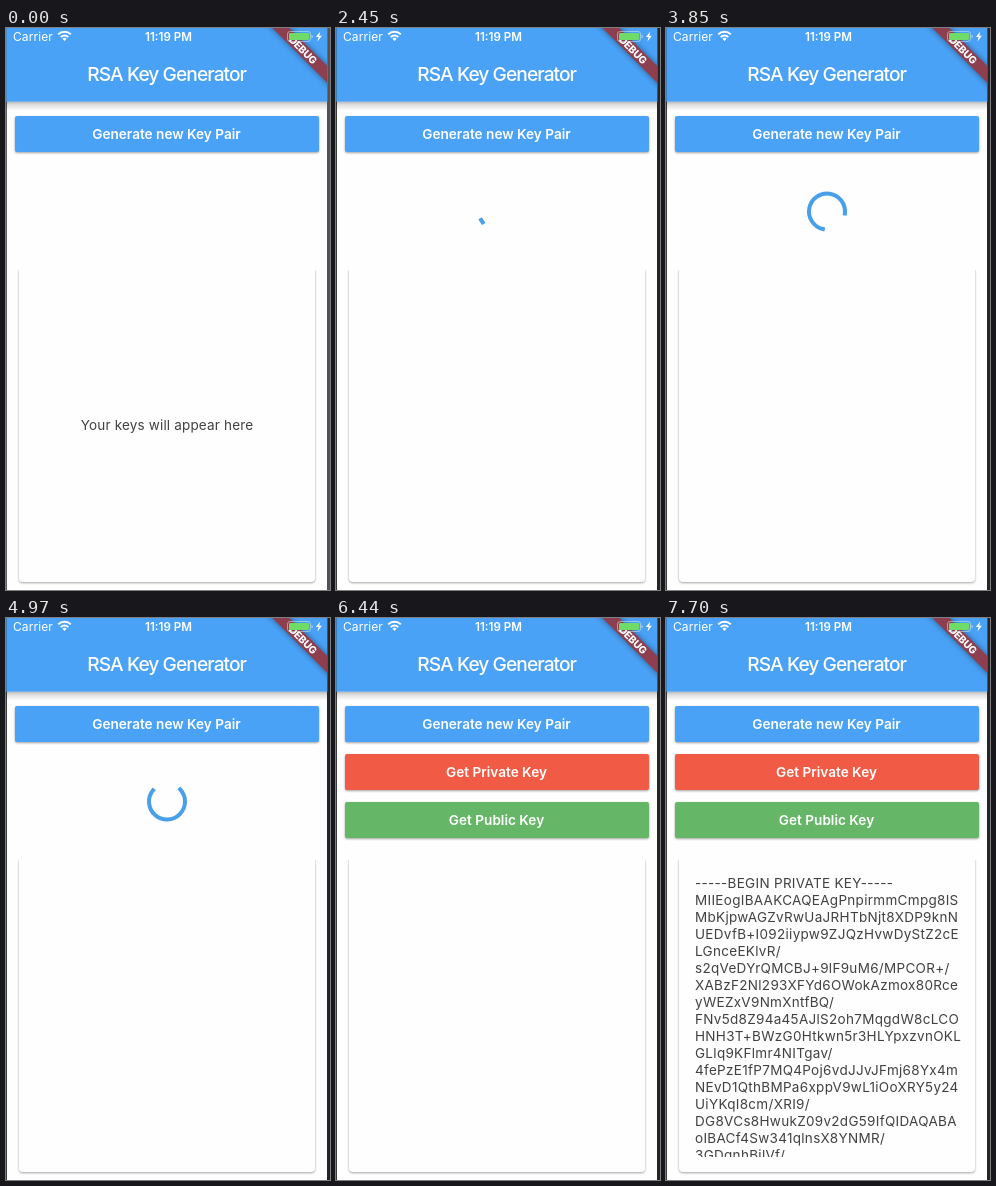
An HTML page that plays this animation: 324 px wide and 562 px high, repeating every 8 s.

```html
<!DOCTYPE html>
<html lang="en">
<head>
<meta charset="utf-8">
<title>RSA Key Generator</title>
<style>
  html, body { margin: 0; width: 100%; height: 100%; overflow: hidden; background: #fff; }
  svg { display: block; width: 324px; height: 562px; }
  text { font-family: Inter, "Open Sans", sans-serif; white-space: pre; }
  .mid { text-anchor: middle; }
  .label { font-size: 13.6px; font-weight: 600; fill: #fff; }
  .body { font-size: 13.5px; fill: #414141; letter-spacing: .17px; }
  #key { letter-spacing: .3px; }
</style>
</head>
<body>
<svg id="stage" viewBox="0 0 324 562" xmlns="http://www.w3.org/2000/svg">
  <defs>
    <clipPath id="page"><rect width="321" height="562"/></clipPath>
    <clipPath id="keyBox"><rect x="13" y="250" width="296" height="289"/></clipPath>
    <linearGradient id="barShade" x2="0" y2="1">
      <stop offset="0" stop-color="#000" stop-opacity=".28"/>
      <stop offset=".35" stop-color="#000" stop-opacity=".13"/>
      <stop offset="1" stop-color="#000" stop-opacity="0"/>
    </linearGradient>
  </defs>
  <rect width="324" height="562" fill="#fefefe"/>

  <g style="filter:drop-shadow(0 1px 1px rgba(0,0,0,.36))">
    <rect x="13" y="239" width="296" height="315" rx="4" fill="#fefefe"/>
  </g>
  <rect x="10" y="234" width="302" height="8" fill="#fefefe"/>
  <text id="hint" class="body mid" x="161" y="402">Your keys will appear here</text>
  <g id="key" class="body" clip-path="url(#keyBox)"></g>

  <path id="ring" fill="none" stroke="#4a9fe9" stroke-width="4" stroke-linecap="square"/>
  <g id="buttons"></g>

  <rect id="edgeL" width="1" height="562"/>
  <rect id="edgeR" x="321" width="3" height="562"/>

  <rect y="73.5" width="321" height="9" fill="url(#barShade)"/>
  <rect x=".4" width="321" height="73.7" fill="#4aa2f7"/>
  <text class="mid" x="160.7" y="53" fill="#fff" font-size="19.2" font-weight="550" letter-spacing="-.95">RSA Key Generator</text>

  <g clip-path="url(#page)">
    <g transform="translate(321 -2) rotate(45)">
      <rect x="-60" y="28" width="120" height="12" fill="#8d3f4f" style="filter:drop-shadow(0 0 3px rgba(0,0,0,.45))"/>
      <text class="mid" y="37.7" fill="#fff" font-size="10.2" font-weight="800" letter-spacing="-.2">DEBUG</text>
    </g>
  </g>

  <g fill="#fff" font-size="12">
    <text x="7" y="12.6" letter-spacing=".1">Carrier</text>
    <text class="mid" x="162.5" y="12.6" font-weight="600" font-size="11.6">11:19 PM</text>
    <g fill="none" stroke="#fff" stroke-width="2">
      <path d="M52.2 6.4a9 9 0 0 1 12.6 0M54.7 9.1a5.4 5.4 0 0 1 7.6 0"/>
    </g>
    <path d="M56.4 10.7a3 3 0 0 1 4.2 0L58.5 13z"/>
    <rect x="281.5" y="3.5" width="23" height="10" rx="2.5" fill="none" stroke="#d8e6e8" stroke-opacity=".55"/>
    <rect x="283" y="5" width="20" height="7" rx="1.2" fill="#6fdc6a"/>
    <path d="M305.7 6.7q2 1.8 0 3.6z" fill="#d8e6e8"/>
    <path d="M314.3 3.5l-4.4 5.6h2.7l-1.2 4.4 4.5-5.8h-2.7z"/>
  </g>
</svg>
<script>
const LOOP = 8000, STEP = 70, LAST = 7700;
const FOCUS = 1120, START = 1340, READY = 5530, SHOW = 6930;
const BLUE = '#4aa2f7', RED = '#f15b46', GREEN = '#66b667';
const KEY = `-----BEGIN PRIVATE KEY-----
MIIEogIBAAKCAQEAgPnpirmmCmpg8IS
MbKjpwAGZvRwUaJRHTbNjt8XDP9knN
UEDvfB+I092iiypw9ZJQzHvwDyStZ2cE
LGnceEKlvR/
s2qVeDYrQMCBJ+9lF9uM6/MPCOR+/
XABzF2Nl293XFYd6OWokAzmox80Rce
yWEZxV9NmXntfBQ/
FNv5d8Z94a45AJlS2oh7MqgdW8cLCO
HNH3T+BWzG0Htkwn5r3HLYpxzvnOKL
GLlq9KFlmr4NITgav/
4fePzE1fP7MQ4Poj6vdJJvJFmj68Yx4m
NEvD1QthBMPa6xppV9wL1iOoXRY5y24
UiYKqI8cm/XRI9/
DG8VCs8HwukZ09v2dG59IfQIDAQABA
oIBACf4Sw341qlnsX8YNMR/
3GDqnhBjlVf/`;

const $ = id => document.getElementById(id);
const clamp = v => Math.max(0, Math.min(1, v));
const lerp = (a, b, u) => a + (b - a) * u;
const show = (el, on) => el.setAttribute('display', on ? 'inline' : 'none');

$('key').innerHTML = KEY.split('\n')
  .map((line, i) => `<text x="29" y="${270 + 17 * i}">${line}</text>`).join('');

function makeButton(y, fill, label, press) {
  const g = document.createElementNS('http://www.w3.org/2000/svg', 'g');
  const box = `x="9" y="${y}" width="304" height="36"`;
  g.innerHTML = `<clipPath id="clip${y}"><rect ${box} rx="2"/></clipPath>
    <rect class="face" ${box} rx="2" fill="${fill}"/>
    <g clip-path="url(#clip${y})">
      <rect class="glow" ${box} fill="#bcbcbc"/>
      <circle class="wave" cy="${y + 18}" fill="#c8c8c8"/>
    </g>
    <text class="label mid" x="160.5" y="${y + 23}">${label}</text>`;
  $('buttons').append(g);
  const part = name => g.querySelector('.' + name);
  return { g, face: part('face'), glow: part('glow'), wave: part('wave'), press };
}

const buttons = [
  makeButton(88, BLUE, 'Generate new Key Pair', { down: 1120, up: 1330, x: 110 }),
  makeButton(136, RED, 'Get Private Key', { down: 6720, up: 6930, x: 150 }),
  makeButton(184, GREEN, 'Get Public Key', null)
];

// Touch ripple: slow while held, fast and fading after release.
function drawButton({ face, glow, wave, press }, t) {
  let r = 0, x = 161, fade = 0, held = 0, lift = 0;
  if (press && t >= press.down) {
    const hold = Math.min(t, press.up) - press.down, after = Math.max(0, t - press.up);
    r = Math.min(180, hold * .15 + after * .63);
    x = lerp(press.x, 161, r / 180);
    fade = .4 * clamp(1 - after / 210);
    held = .3 * clamp(hold / 210) * clamp(1 - after / 130);
    lift = clamp(hold / 210) * clamp(1 - after / 280);
  }
  wave.setAttribute('cx', x);
  wave.setAttribute('r', r);
  wave.setAttribute('opacity', fade);
  glow.setAttribute('opacity', held);
  face.style.filter = `drop-shadow(0 ${1 + lift}px ${1.2 + 1.6 * lift}px rgba(0,0,0,.37))`;
}

// Cubic curve (.4, 0, .2, 1) solved by bisection.
function ease(x) {
  let a = 0, b = 1, s = .5;
  for (let i = 0; i < 24; i++) {
    s = (a + b) / 2;
    const v = 1 - s;
    if (1.2 * v * v * s + .6 * v * s * s + s * s * s < x) a = s; else b = s;
  }
  return s * s * (3 - 2 * s);
}

// Turns of the ring; it loses a little time half way through.
function ringPhase(t) {
  const lag = .08 * clamp((t - 3850) / 1120);
  return Math.max(0, .117 + (t - 1470) / 1044 - lag);
}

function ringPath(p) {
  const n = Math.floor(p), f = p - n;
  const head = ease(clamp(f * 2)), tail = ease(clamp(f * 2 - 1));
  const from = Math.PI * (-.5 + 1.5 * tail + 1.7 * f + 1.2 * n);
  const sweep = Math.max(Math.PI * 1.5 * (head - tail), .001);
  const at = a => `${161 + 18 * Math.cos(a)} ${183.5 + 18 * Math.sin(a)}`;
  return `M${at(from)}A18 18 0 ${sweep > Math.PI ? 1 : 0} 1 ${at(from + sweep)}`;
}

function draw(t) {
  const busy = t >= START && t < READY;
  show($('hint'), t < START);
  show($('key'), t >= SHOW);
  show($('ring'), busy);
  if (busy) $('ring').setAttribute('d', ringPath(ringPhase(t)));
  buttons.forEach((b, i) => {
    show(b.g, i === 0 || t >= READY);
    drawButton(b, t);
  });
  $('edgeL').setAttribute('fill', t < FOCUS ? '#626264' : '#3a3a3c');
  $('edgeR').setAttribute('fill', t < FOCUS ? '#525255' : '#252528');
}

const begin = performance.now();
function tick() {
  const t = (performance.now() - begin) % LOOP;
  draw(Math.min(LAST, Math.floor(t / STEP) * STEP));
  requestAnimationFrame(tick);
}
tick();
</script>
</body>
</html>
```
